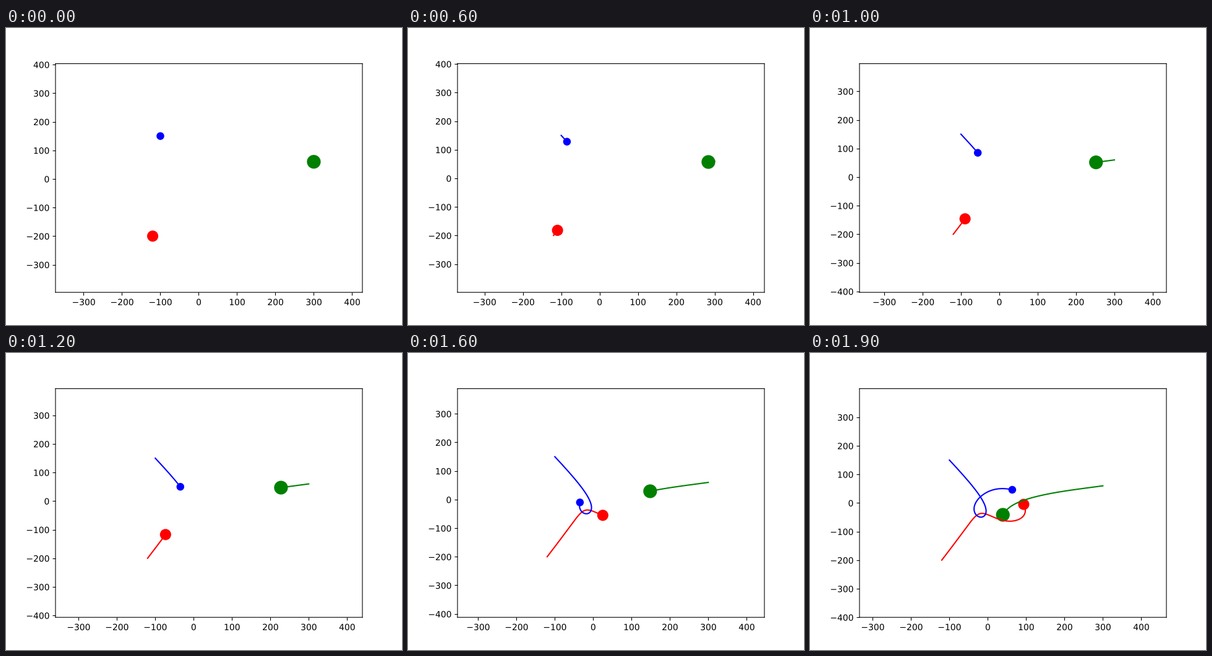
Recreate the animation shown at these times as a matplotlib script. Size 640 by 480 pixels, loop 2 s.

```python
import numpy as np
import matplotlib.pyplot as plt
from matplotlib import patheffects
from matplotlib.animation import FuncAnimation

FRAMES, STEPS = 20, 100
G = 1.0
HALF = 400

# Smooth, unsnapped frame lines and labels
plt.rcParams["path.snap"] = False
plt.rcParams["path.effects"] = [patheffects.Normal()]

masses = np.array([12.0, 8.0, 15.0])
start = np.array([[-120.0, -200.0], [-100.0, 150.0], [300.0, 60.0]])
colors = ["red", "blue", "green"]


def pull(pos, i):
    """Acceleration of body i towards the other bodies."""
    acc = np.zeros(2)
    for j, mass in enumerate(masses):
        if j != i:
            gap = pos[j] - pos[i]
            acc += G * mass * gap / np.hypot(*gap) ** 3
    return acc


def simulate():
    pos, vel = start.copy(), np.zeros_like(start)
    path = [pos.copy()]
    for _ in range((FRAMES - 1) * STEPS):
        # Bodies move one after another, each seeing the latest places
        for i in range(len(masses)):
            vel[i] += pull(pos, i)
            pos[i] += vel[i]
        path.append(pos.copy())
    return np.array(path)


path = simulate()
fig, ax = plt.subplots(figsize=(6.4, 4.8), dpi=100)
trails = [ax.plot([], [], color=c)[0] for c in colors]
dots = [ax.plot([], [], "o", color=c, markersize=m, zorder=1)[0]
        for c, m in zip(colors, masses)]


def draw(frame):
    last = frame * STEPS
    for i, (trail, dot) in enumerate(zip(trails, dots)):
        trail.set_data(path[:last + 1, i, 0], path[:last + 1, i, 1])
        dot.set_data(path[last:last + 1, i, 0], path[last:last + 1, i, 1])
    cx, cy = path[last].mean(axis=0)
    ax.set_xlim(cx - HALF, cx + HALF)
    ax.set_ylim(cy - HALF, cy + HALF)
    return trails + dots


anim = FuncAnimation(fig, draw, frames=FRAMES, init_func=lambda: draw(0),
                     interval=100, repeat=True, repeat_delay=0)
plt.show()
```
